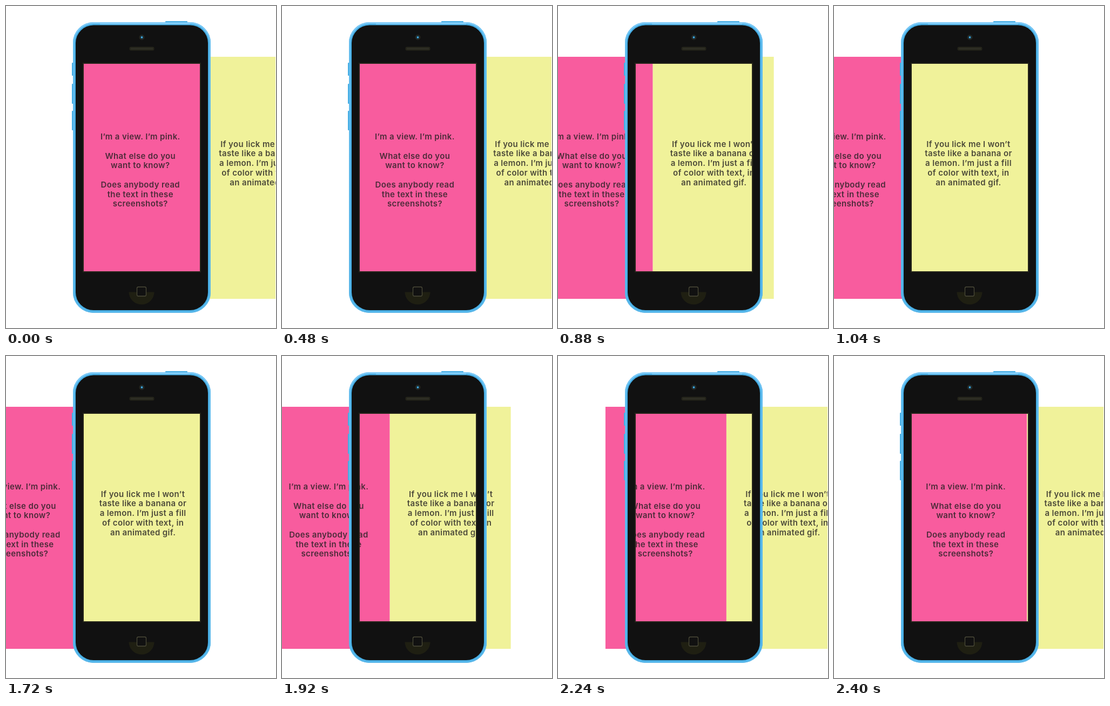
Write an HTML page that moves like this. It is 500 px wide and 596 px high and loops after 2440 ms.

```html
<!DOCTYPE html>
<html lang="en">
<head>
<meta charset="utf-8">
<title>Sliding views</title>
<style>
  html, body { margin: 0; width: 100%; height: 100%; overflow: hidden; background: #fff; }
  svg { display: block; width: 100%; height: 100%; }
  text {
    font: 600 15px Inter, "Open Sans", sans-serif;
    letter-spacing: .36px;
    text-anchor: middle;
    fill: #231f20;
    fill-opacity: .8;
  }
</style>
</head>
<body>
<svg viewBox="0 0 500 596">
  <defs>
    <clipPath id="stage"><rect width="499" height="596"/></clipPath>
    <linearGradient id="rim" x1="0" x2="0" y1="0" y2="1">
      <stop offset="0" stop-color="#7ccaf8"/>
      <stop offset=".08" stop-color="#62bdef"/>
      <stop offset="1" stop-color="#58b7ea"/>
    </linearGradient>
  </defs>

  <g clip-path="url(#stage)">
    <g id="views">
      <rect x="138" y="94" width="224" height="448" fill="#f85c9e"/>
      <rect x="362" y="94" width="224" height="448" fill="#f0f29a"/>
    </g>
  </g>

  <!-- buttons -->
  <g fill="#45ade4">
    <rect x="295" y="28" width="41" height="4" rx="1"/>
    <rect x="122" y="105" width="4" height="24" rx="1"/>
    <rect x="122" y="144" width="4" height="37" rx="1"/>
    <rect x="122" y="194" width="4" height="36" rx="1"/>
  </g>

  <!-- body with an open screen -->
  <path id="shell" fill="#45ade4" fill-rule="evenodd"/>
  <rect x="125.5" y="31.5" width="252" height="535" rx="36.5" fill="none" stroke="url(#rim)" stroke-width="3"/>
  <path d="M174 32.5H341" stroke="#80cdf9" stroke-width="3"/>
  <path id="face" fill="#111" fill-rule="evenodd"/>
  <rect x="143" y="106" width="217" height="386" fill="none" stroke="#24241a" stroke-width="2"/>

  <!-- camera, speaker, home button -->
  <circle cx="251.5" cy="58" r="5" fill="#24251f"/>
  <circle cx="251.5" cy="58" r="2.9" fill="#17394a"/>
  <circle cx="251.5" cy="58" r="1.7" fill="#4ab0e6"/>
  <rect x="228.5" y="75.5" width="46" height="7" rx="3" fill="#24241a"/>
  <path d="M231 79H272" stroke="#2e2e25" stroke-width="3"/>
  <path d="M227.5 529.5H274.5A23.5 23 0 0 1 227.5 529.5Z" fill="#1f1f12"/>
  <rect x="242.5" y="520" width="17" height="17" rx="2.5" fill="#111" stroke="#4b4a38" stroke-width="1.3"/>
</svg>
<script>
  const $ = id => document.getElementById(id);
  const FRAME = 40, LOOP = 2440, TRAVEL = 226, LEADING = 17.75;

  function addLines(x, y, lines) {
    lines.forEach((line, i) => {
      if (!line) return;
      const el = document.createElementNS("http://www.w3.org/2000/svg", "text");
      el.setAttribute("x", x);
      el.setAttribute("y", y + i * LEADING);
      el.textContent = line;
      $("views").append(el);
    });
  }

  const roundRect = (x, y, w, h, r) =>
    `M${x + r} ${y}h${w - 2 * r}a${r} ${r} 0 0 1 ${r} ${r}v${h - 2 * r}` +
    `a${r} ${r} 0 0 1 ${-r} ${r}h${2 * r - w}a${r} ${r} 0 0 1 ${-r} ${-r}` +
    `v${2 * r - h}a${r} ${r} 0 0 1 ${r} ${-r}z`;

  // Ease in and out; reach is the horizontal length of both bezier handles.
  function ease(x, reach) {
    if (x <= 0) return 0;
    if (x >= 1) return 1;
    let lo = 0, hi = 1, t;
    for (let i = 0; i < 30; i++) {
      t = (lo + hi) / 2;
      const u = 1 - t;
      const bx = 3 * reach * t * u * u + 3 * (1 - reach) * t * t * u + t * t * t;
      if (bx < x) lo = t; else hi = t;
    }
    return t * t * (3 - 2 * t);
  }

  function draw(ms) {
    const tick = Math.floor((ms % LOOP) / FRAME);
    const shift = ease((tick - 11) / 15, 1 / 3) - ease((tick - 42) / 19, 1 / 6);
    $("views").setAttribute("transform", `translate(${-TRAVEL * shift} 0)`);
  }

  addLines(248.8, 247, [
    "I’m a view. I’m pink.", "",
    "What else do you", "want to know?", "",
    "Does anybody read", "the text in these", "screenshots?"
  ]);
  addLines(475, 260.5, [
    "If you lick me I won’t", "taste like a banana or",
    "a lemon. I’m just a fill", "of color with text, in", "an animated gif."
  ]);

  const hole = "M144 107H359V491H144Z";
  $("shell").setAttribute("d", roundRect(124, 30, 255, 538, 38) + hole);
  $("face").setAttribute("d", roundRect(129, 35.5, 245, 527.5, 33) + hole);

  let start;
  function loop(now) {
    start ??= now;
    draw(now - start);
    requestAnimationFrame(loop);
  }
  draw(0);
  requestAnimationFrame(loop);
</script>
</body>
</html>
```
